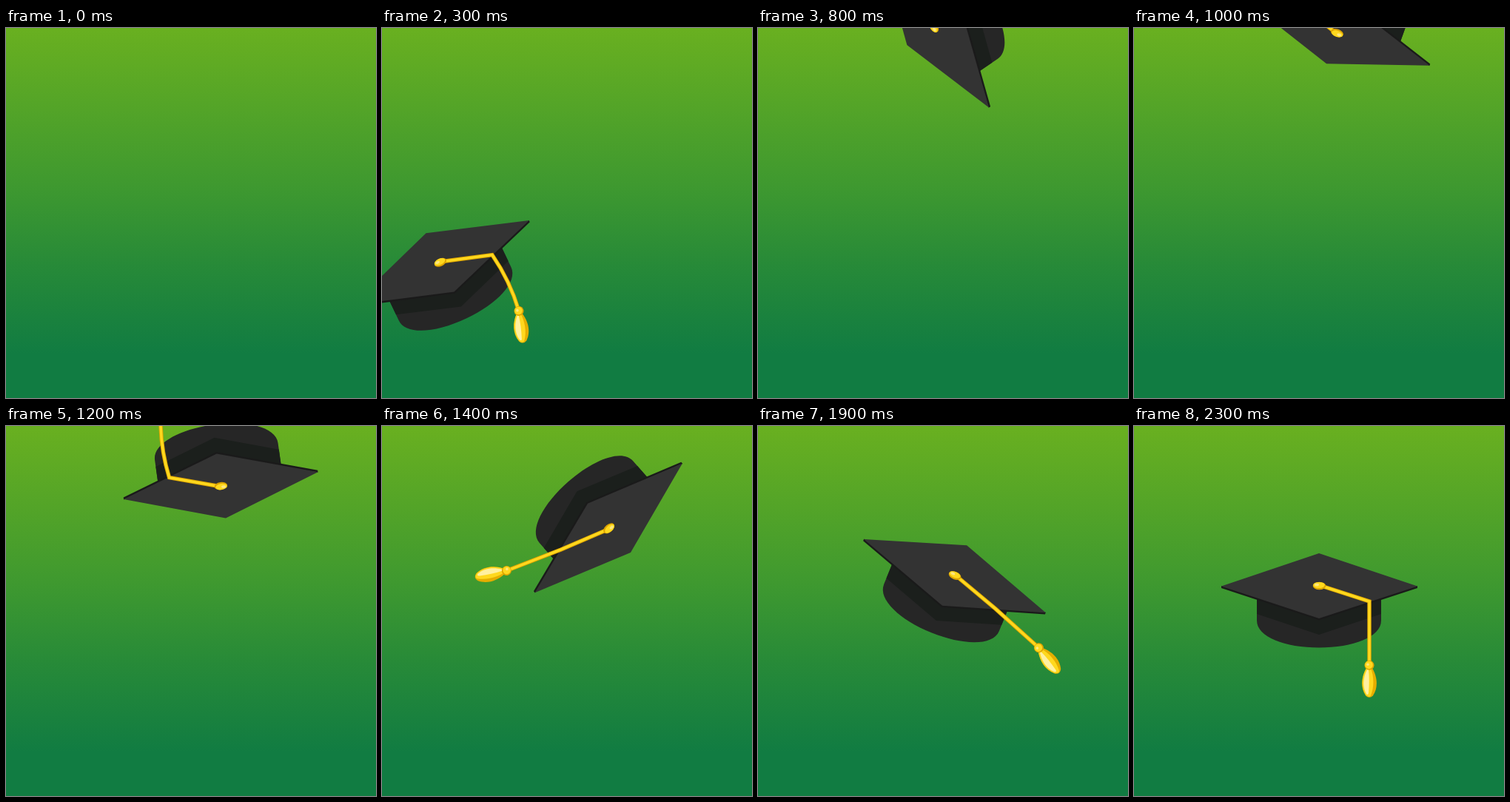
Write an HTML page that moves like this. It is 500x500 px and loops after 4.3 s.

```html
<!DOCTYPE html>
<html lang="en">
<head>
<meta charset="utf-8">
<title>Graduation cap toss</title>
<style>
html, body { margin: 0; width: 100%; height: 100%; overflow: hidden; background: #117c42; }
svg { display: block; width: 100vw; height: 100vh; }
</style>
</head>
<body>
<svg viewBox="0 0 500 500">
  <defs>
    <linearGradient id="sky" x1="0" y1="0" x2="0" y2="1">
      <stop offset="0" stop-color="#69b020"/>
      <stop offset=".44" stop-color="#3d9830"/>
      <stop offset=".64" stop-color="#278a38"/>
      <stop offset=".88" stop-color="#117c42"/>
    </linearGradient>
  </defs>
  <rect width="500" height="500" fill="url(#sky)"/>
  <!-- The cap's own origin is the button on the board. -->
  <g id="cap" visibility="hidden">
    <path fill="#262626" d="M-84 12V48C-84 70-46 84.5 0 84.5S84 70 84 48V12Z"/>
    <path fill="#1b1f1c" d="M-84 12V39L0 67L84 39V12Z"/>
    <path fill="#1a1a1a" d="M-132 1L0 43L133 1V4L0 47.5L-132 4Z"/>
    <path fill="#333" d="M-132 1.5L0-43L133 1.5L0 45Z"/>
    <path id="cordEdge" fill="none" stroke="#dda400" stroke-width="5.4"/>
    <path id="cord" fill="none" stroke="#ffd81e" stroke-width="3.5"/>
    <ellipse cx=".5" cy="1" rx="8.8" ry="5.2" fill="#dda400"/>
    <ellipse cx="0" cy="0" rx="7.8" ry="4.1" fill="#ffd81e"/>
    <ellipse cx="-3" cy="-.5" rx="3" ry="1.8" fill="#ffe780"/>
    <g id="tassel">
      <path fill="#e5ad00" d="M-4 4C-10 14-13 29-5 41Q0 46 5 41C13 29 10 14 4 4Z"/>
      <path fill="#ffd81e" d="M-4 4C-10 14-12 29-5 40Q0 45 2 41C7 29 6 14 2 4Z"/>
      <path fill="#fff0a0" d="M-3 6C-8 16-10 28-4 39Q-1 41-1 37C0 26 0 16-1 6Z"/>
      <circle r="6.5" fill="#dda400"/>
      <circle cx="-.5" cy="-.4" r="5.3" fill="#ffd81e"/>
      <circle cx="-2" cy="-1" r="1.8" fill="#ffe780"/>
    </g>
  </g>
</svg>
<script>
const LOOP = 4300, STEP = 100, LAST = 23;
const CORNER = [68, 22];

// A few points of the throw; a smooth curve joins them.
const PATH = [
  { t: 1, x: 21, y: 436, turn: -7 },
  { t: 3, x: 78, y: 316, turn: -25.5 },
  { t: 6, x: 160, y: 146, turn: -63 },
  { t: 8, x: 237, y: -1, turn: -124 },
  { t: 12, x: 291, y: 82, turn: -188 },
  { t: 16, x: 309, y: 186, turn: -260 },
  { t: 19, x: 266, y: 201, turn: -338 },
  { t: 21, x: 226, y: 210, turn: -366 },
  { t: 23, x: 250, y: 215, turn: -360 }
];

const el = id => document.getElementById(id);
const cap = el('cap'), cord = el('cord'), cordEdge = el('cordEdge'), tassel = el('tassel');
const rad = deg => deg * Math.PI / 180;
const polar = ([x, y], deg, len) => [x + len * Math.cos(rad(deg)), y + len * Math.sin(rad(deg))];

function ramp(from, to, t) {
  const u = Math.min(1, Math.max(0, (t - from) / (to - from)));
  return u * u * (3 - 2 * u);
}

const rate = (i, key) => (PATH[i + 1][key] - PATH[i][key]) / (PATH[i + 1].t - PATH[i].t);

// Tangent at a point: its two neighbouring rates, the nearer one weighing more.
function slope(i, key) {
  if (i === 0) return rate(0, key);
  if (i === PATH.length - 1) return rate(i - 1, key);
  const before = PATH[i].t - PATH[i - 1].t, after = PATH[i + 1].t - PATH[i].t;
  return (rate(i - 1, key) * after + rate(i, key) * before) / (before + after);
}

function along(t, key) {
  const i = Math.max(0, PATH.findIndex(p => p.t >= t) - 1);
  const a = PATH[i], b = PATH[i + 1], h = b.t - a.t, u = (t - a.t) / h;
  return a[key] + (b[key] - a[key]) * u * u * (3 - 2 * u)
    + h * u * (1 - u) * (slope(i, key) * (1 - u) - slope(i + 1, key) * u);
}

// The cord hangs, trails on the way up, is flung straight, then hangs again.
function swing(t) {
  const landed = ramp(19, 21, t);
  const flung = ramp(12, 13.2, t) - landed;
  const trail = 35 * Math.exp(-((t - 6) ** 2));
  const angle = 90 - 70 * flung + trail;
  const bend = 9 * (1 - flung) * (1 - landed);
  return { angle, bend, hang: angle + 2 * bend + 9 * flung };
}

function draw(ms) {
  const t = Math.min(LAST, Math.floor(ms / STEP));
  cap.setAttribute('visibility', t ? 'visible' : 'hidden');
  if (!t) return;

  const { angle, bend, hang } = swing(t);
  const len = 87 - 8 * Math.cos(rad(angle - 18)) ** 2 - bend / 4;
  const knot = polar(CORNER, angle, len);
  const ctrl = polar(CORNER, angle - bend, len / 2 / Math.cos(rad(bend)));
  const d = `M0 0L${CORNER}Q${ctrl} ${knot}`;

  cap.setAttribute('transform',
    `translate(${along(t, 'x')} ${along(t, 'y')}) rotate(${along(t, 'turn')})`);
  cord.setAttribute('d', d);
  cordEdge.setAttribute('d', d);
  tassel.setAttribute('transform', `translate(${knot}) rotate(${hang - 90})`);
}

const start = performance.now();
function tick() {
  draw((performance.now() - start) % LOOP);
  requestAnimationFrame(tick);
}
tick();
</script>
</body>
</html>
```
